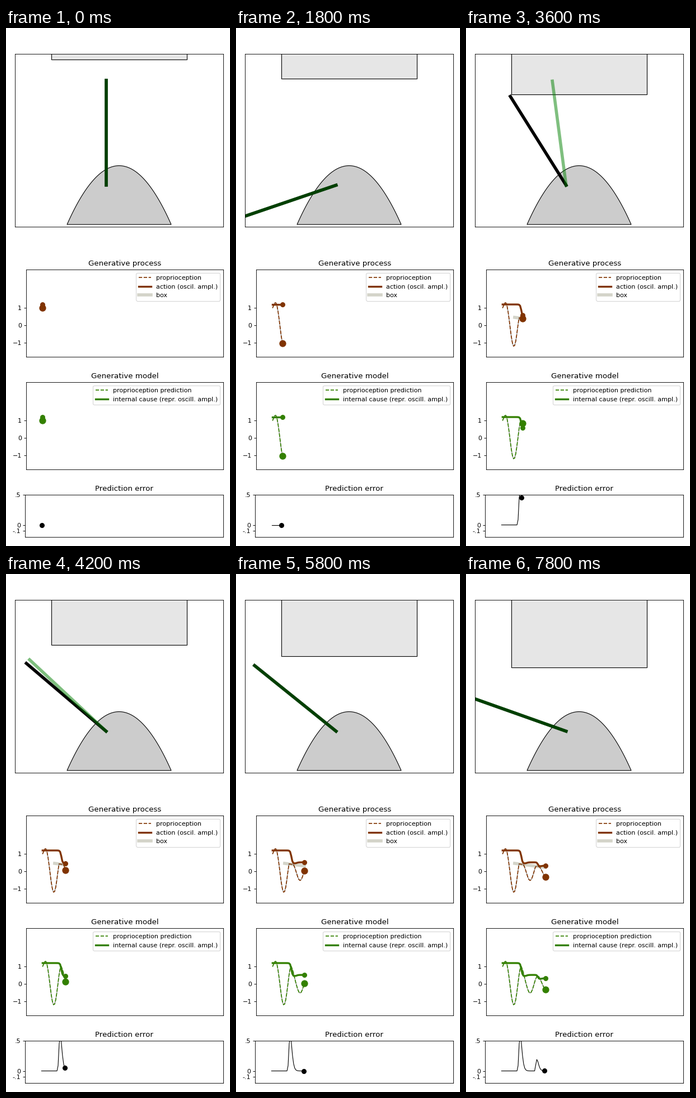
Animation, 400 px wide and 920 px high, one loop 8000 ms. Source, as a matplotlib script:

```python
import numpy as np
import matplotlib.pyplot as plt
from matplotlib.animation import FuncAnimation
from matplotlib.patches import Polygon, Rectangle

W, H, DPI = 400, 920, 80
FRAMES, STEP_MS, SPAN = 40, 200, 150
BROWN, GREEN, BOX = (.5, .2, 0), (.2, .5, 0), (.83, .83, .79)
PIVOT, ROD = np.array([178.7, 279.2]), 186.5
OMEGA, FIRST_PEAK = .4255, 2.936
FIRST_BOX = 11

n = np.arange(FRAMES)


def ramp(center, width):
    return 1 / (1 + np.exp(-(n - center) / width))


def pulse(start, rise, sharpness, height):
    x = np.maximum(n - start, 0) / rise
    return height * (x * np.exp(1 - x)) ** sharpness


# each hit on the box lowers the amplitude, which then recovers a little
ampl = (1.2 - .75 * ramp(17.2, .55) + .07 * ramp(22, .8)
        - .23 * ramp(32.2, .45) + .04 * ramp(36, .8))
error = pulse(14, 2.9, 4.7, .6) + pulse(30, 2.1, 3, .19)
box_level = .46 - .0083 * (n - FIRST_BOX)
box_bottom = 56 + 195 * (1 - np.exp(-n / 47))

# the arm oscillates after a start-up transient; the box stops it
free = ampl * np.cos(OMEGA * (n - FIRST_PEAK)) + .62 * np.exp(-n / 1.6)
angle = np.where(n < FIRST_BOX, free, np.minimum(free, box_level))
swing = angle + error

fig = plt.figure(figsize=(W / DPI, H / DPI), dpi=DPI, facecolor="white")


def add_axes(left, top, right, bottom):
    ax = fig.add_axes([left / W, 1 - bottom / H,
                       (right - left) / W, (bottom - top) / H])
    ax.set_xticks([])
    ax.set_yticks([])
    return ax


def add_plot(rect, title, ylim, ticks, labels=None):
    ax = add_axes(*rect)
    ax.set_title(title)
    ax.set_xlim(-.1 * SPAN, 1.1 * SPAN)
    ax.set_ylim(*ylim)
    ax.set_yticks(ticks, labels)
    return ax


def add_dot(ax, size, color):
    return ax.scatter([0], [0], s=size, color=[color], zorder=3)


def add_traces(ax, color, position_label, ampl_label):
    under, = ax.plot([], [], color=".5", lw=1)
    dashed, = ax.plot([], [], "--", color=color, lw=1.5, label=position_label)
    solid, = ax.plot([], [], color=color, lw=3, label=ampl_label)
    return under, dashed, solid, add_dot(ax, 100, color), add_dot(ax, 50, color)


# arm scene, in pixel coordinates
scene = add_axes(16, 46.5, 388, 353.5)
scene.set_xlim(16, 388)
scene.set_ylim(353.5, 46.5)
u = np.linspace(-1, 1, 60)
scene.add_patch(Polygon(np.c_[202 + 93 * u, 244.5 + 104.5 * u ** 2],
                        fc=".8", ec="black", lw=1))
box = scene.add_patch(Rectangle((81, 30), 242, 26, fc=".9", ec="black", lw=1))
real_arm, = scene.plot([], [], color="black", lw=5)
model_arm, = scene.plot([], [], color="green", lw=5, alpha=.5)

process = add_plot((36, 429, 388, 584), "Generative process",
                   (-1.8, 3.2), [-1, 0, 1])
process_parts = add_traces(process, BROWN, "proprioception",
                           "action (oscil. ampl.)")
box_line, = process.plot([], [], color=BOX, lw=5, zorder=1.5, label="box")
process.legend(loc="upper right")

model = add_plot((36, 629, 388, 784), "Generative model",
                 (-1.8, 3.2), [-1, 0, 1])
model_parts = add_traces(model, GREEN, "proprioception prediction",
                         "internal cause (repr. oscill. ampl.)")
model.legend(loc="upper right")

mismatch = add_plot((34, 829, 388, 904), "Prediction error",
                    (-.2, .5), [-.1, 0, .5], ["-.1", "0", ".5"])
error_line, = mismatch.plot([], [], color="black", lw=1)
error_dot = add_dot(mismatch, 50, "black")


def set_arm(line, value):
    turn = .3 * np.pi * (1 - value)
    tip = PIVOT - ROD * np.array([np.sin(turn), np.cos(turn)])
    line.set_data([PIVOT[0], tip[0]], [PIVOT[1], tip[1]])


def set_traces(parts, position, i):
    under, dashed, solid, big, small = parts
    past = n[:i + 1]
    under.set_data(past, position[:i + 1])
    dashed.set_data(past, position[:i + 1])
    solid.set_data(past, ampl[:i + 1])
    big.set_offsets([[i, position[i]]])
    small.set_offsets([[i, ampl[i]]])
    # a single point would show as a cap only
    for line in (under, dashed, solid):
        line.set_visible(i > 0)


def update(i):
    box.set_height(box_bottom[i] - box.get_y())
    # the start-up transient is measured from the upright pose
    set_arm(real_arm, angle[i] - (angle[0] - 1))
    set_arm(model_arm, swing[i] - (swing[0] - 1))
    set_traces(process_parts, angle, i)
    set_traces(model_parts, swing, i)
    box_line.set_data(n[FIRST_BOX:i + 1], box_level[FIRST_BOX:i + 1])
    error_line.set_data(n[:i + 1], error[:i + 1])
    error_dot.set_offsets([[i, error[i]]])
    return []


anim = FuncAnimation(fig, update, frames=FRAMES, interval=STEP_MS,
                     init_func=lambda: update(0), repeat=True, repeat_delay=0)
plt.show()
```
